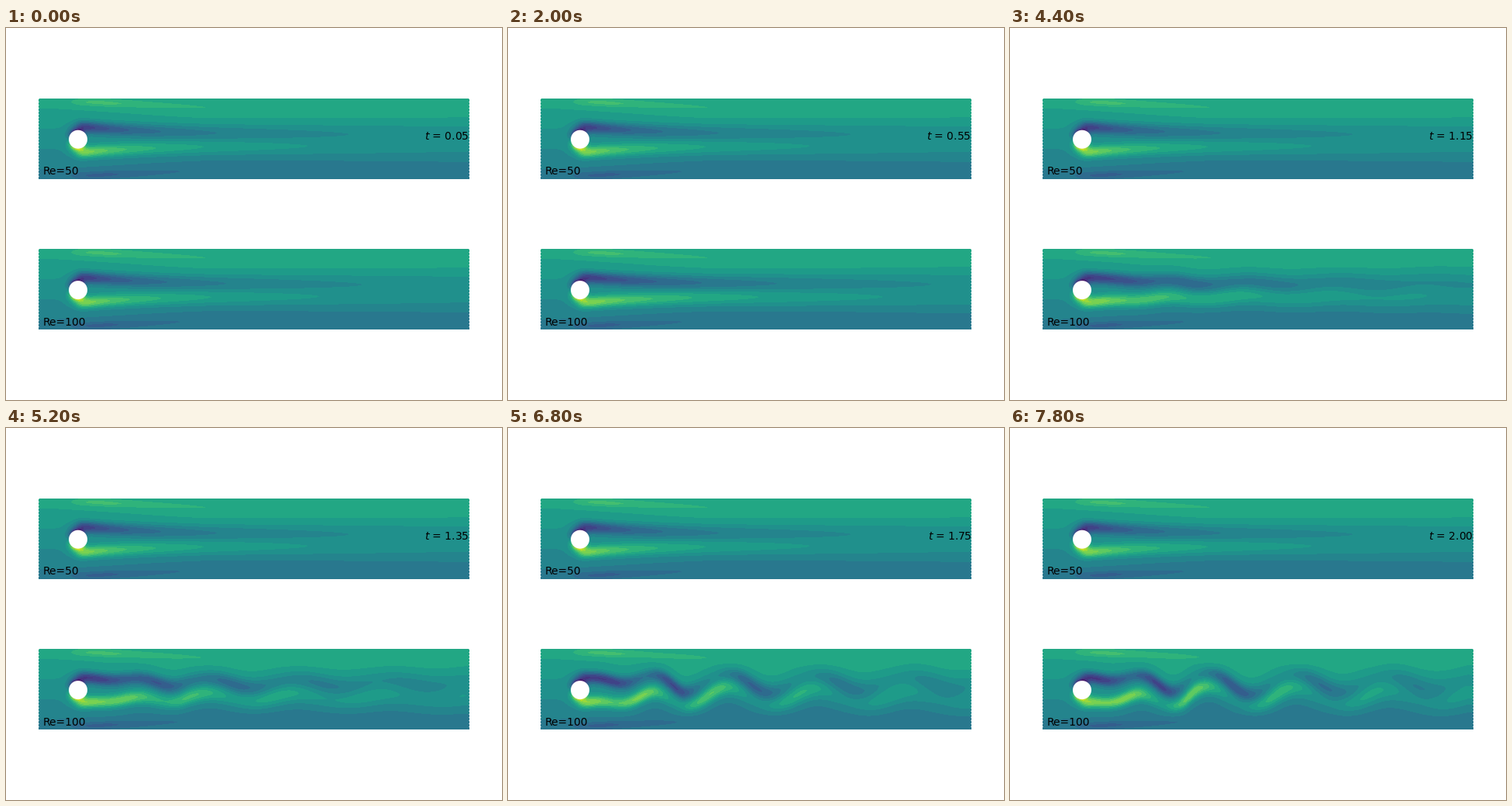
A matplotlib script for the animation above (8 s loop, 640 px wide and 480 px high).

```python
import numpy as np
import matplotlib.pyplot as plt
from matplotlib.animation import FuncAnimation
from matplotlib.patches import Circle

FRAMES, INTERVAL = 40, 200
LEFT, RIGHT, HEIGHT = 42, 598, 104
TOPS = (90.7, 285.1)
CYL_X, CYL_V, CYL_R = 93, 53, 12.5
MID = HEIGHT / 2

X, V = np.meshgrid(np.arange(LEFT, RIGHT) + 0.5, np.arange(HEIGHT) + 0.5)
D = np.maximum(X - CYL_X, 0)

# wave count along the channel: x of successive vortices at t = 2
WAVES = np.interp(X, [60, 150, 237, 350, 470, 590], [-1, 0, 1, 2, 3, 4])


def sigmoid(z):
    return 1 / (1 + np.exp(-z))


def bump(z, width):
    return np.exp(-(z / width) ** 2)


def wall_streaks():
    """Faster shear at both walls beside the cylinder."""
    rise = sigmoid((X - 90) / 8)
    past = np.maximum(X - 130, 0)
    depth = 5 + 0.045 * np.maximum(X - 110, 0)
    top = 0.1 * bump(V - depth, 5) * np.exp(-past / 110)
    low = 0.1 * bump(HEIGHT - V - depth, 5) * np.exp(-past / 85)
    return rise * (top - low)


def boundary_layer():
    """Thin sheet of vorticity around the front of the cylinder."""
    dx, dy = X - CYL_X, CYL_V - V
    r = np.hypot(dx, dy)
    fade = sigmoid((101 - X) / 4)
    return -0.4 * dy / r * np.exp(-np.maximum(r - CYL_R, 0) / 4) * fade


STATIC = wall_streaks() + boundary_layer()


def vorticity(length, swing=0.0, t=0.0):
    """Vorticity scaled to 0..1; swing is the strength of the shedding."""
    phase = 2 * np.pi * (WAVES - 3 * (t - 2))
    ramp = np.clip((X - 105) / 120, 0, 1) * np.exp(-np.maximum(X - 300, 0) / 400)
    lift = 15 * swing * ramp * np.cos(phase - 1.0)
    v = V + lift * (1 - ((V - MID) / MID) ** 2)

    s = (MID - v) / MID
    mix = np.clip((X - 60) / 200, 0, 1)
    base = 0.5 + 0.1 * ((1 - mix) * s + mix * np.tanh(2.2 * s))

    strength = 0.42 / (1 + D / length) * sigmoid((X - 95) / 4)
    beat = 0.7 * swing * ramp * np.cos(phase)
    width = 7.5 + 0.017 * D
    upper = bump(v - 45 + 9 * np.exp(-D / 100), width)
    lower = bump(v - 62 - 8 * np.exp(-D / 90), width)
    return base + STATIC + strength * ((1 + beat) * lower - (1 - beat) * upper)


def paint(field):
    """Banded colours, with the two end columns dotted."""
    rgba = plt.cm.viridis(np.round(np.clip(field, 0, 1) * 20) / 20)
    rgba[::4, [0, -1], 3] = 0.35
    return rgba


def moment(i):
    t = 0.05 * (i + 1)
    length = 65 + 50 * (1 - np.exp(-t / 0.5))
    return t, paint(vorticity(length, sigmoid((t - 1.42) / 0.16), t))


fig = plt.figure(figsize=(6.4, 4.8), dpi=100, facecolor="white")
ax = fig.add_axes([0, 0, 1, 1])


def panel(top, label, image):
    im = ax.imshow(image, extent=(LEFT, RIGHT, top + HEIGHT, top),
                   interpolation="nearest", aspect="auto")
    ax.add_patch(Circle((CYL_X, top + CYL_V), CYL_R - 0.5, fc="white", ec="none"))
    ax.text(47.5, top + 98.5, label, fontsize=10)
    return im


panel(TOPS[0], "Re=50", paint(vorticity(65)))
wake = panel(TOPS[1], "Re=100", moment(0)[1])
clock = ax.text(RIGHT, TOPS[0] + 53, "", fontsize=10, ha="right")
ax.set_xlim(0, 640)
ax.set_ylim(480, 0)
ax.axis("off")


def update(i):
    t, image = moment(i)
    wake.set_data(image)
    clock.set_text(f"$t$ = {t:.2f}")
    return wake, clock


anim = FuncAnimation(fig, update, frames=FRAMES, interval=INTERVAL,
                     init_func=lambda: update(0), repeat=True, repeat_delay=0)
plt.show()
```
